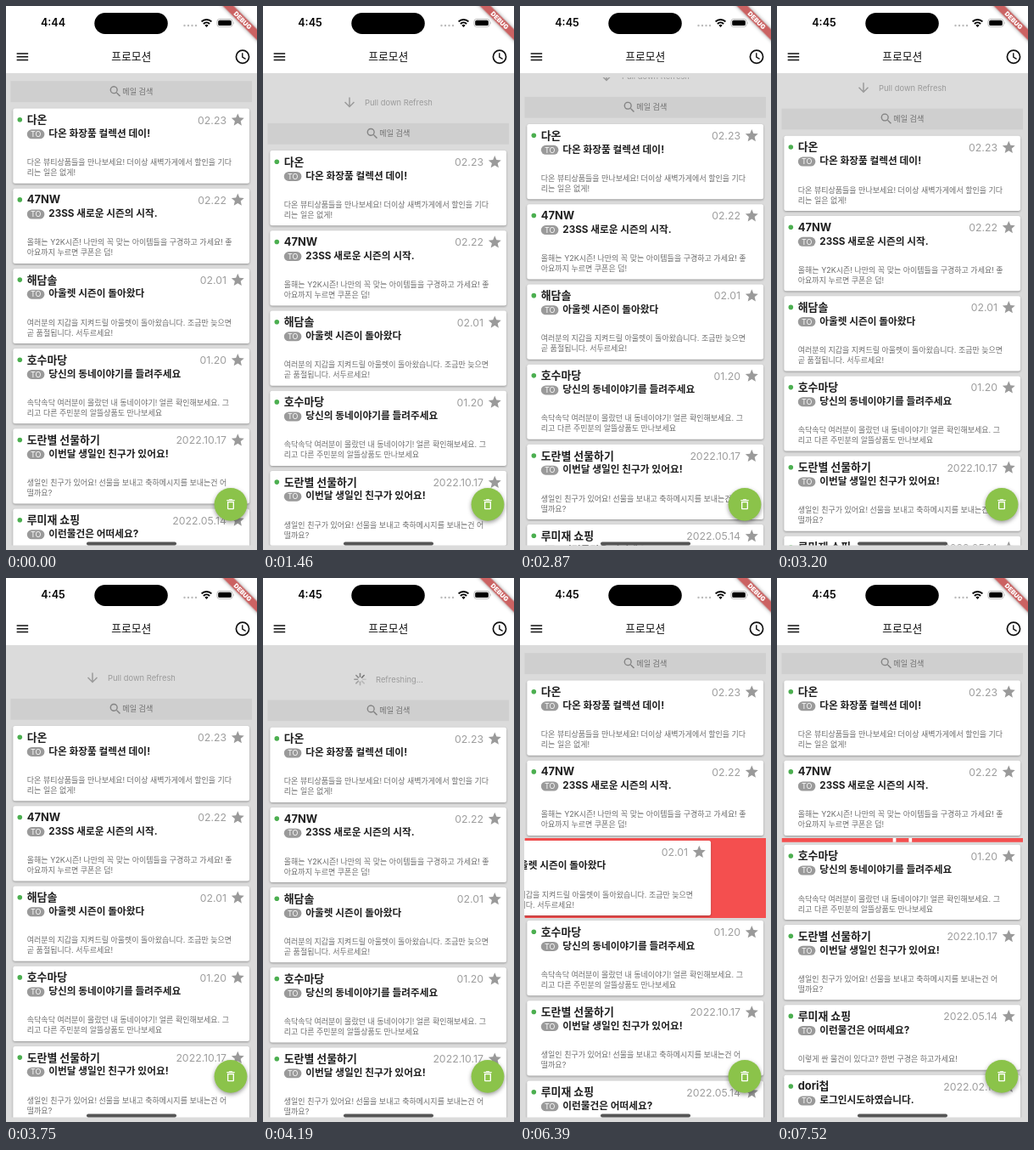
Recreate the animation shown at these times as an HTML page. Size 296 px wide and 640 px high, loop 8000 ms.

```html
<!DOCTYPE html>
<html lang="ko">
<head>
<meta charset="utf-8">
<title>프로모션</title>
<style>
html, body { margin: 0; width: 100%; height: 100%; overflow: hidden; background: #fff; }
#stage { display: block; width: 100vw; height: 100vh; font-family: Inter, "Noto Sans CJK KR", "Noto Sans CJK", sans-serif; }
.card { fill: #fff; filter: drop-shadow(0 1px 1px rgba(0, 0, 0, .32)); }
.title { font-size: 12.9px; font-weight: 700; fill: #1f1f1f; }
.sub { font-size: 11.7px; font-weight: 700; fill: #1f1f1f; }
.body { font-size: 9px; fill: #6c6c6c; }
.date { font-size: 12.3px; fill: #9e9e9e; text-anchor: end; }
.pill { font-size: 9px; fill: #fff; text-anchor: middle; }
.head { font-size: 9.4px; fill: #9b9b9b; }
</style>
</head>
<body>
<svg id="stage" viewBox="0 0 296 640" xmlns="http://www.w3.org/2000/svg"></svg>
<script>
const LOOP = 8000;
const TOP = 120.5, TALL = 94.2, SHORT = 82.6, GAP = 6, SWIPED = 2;

const mails = [
  ['다온', '02.23', '다온 화장품 컬렉션 데이!', '다온 뷰티상품들을 만나보세요! 더이상 새벽가게에서 할인을 기다', '리는 일은 없게!'],
  ['47NW', '02.22', '23SS 새로운 시즌의 시작.', '올해는 Y2K시즌! 나만의 꼭 맞는 아이템들을 구경하고 가세요! 좋', '아요까지 누르면 쿠폰은 덤!'],
  ['해담솔', '02.01', '아울렛 시즌이 돌아왔다', '여러분의 지갑을 지켜드릴 아울렛이 돌아왔습니다. 조금만 늦으면', '곧 품절됩니다. 서두르세요!'],
  ['호수마당', '01.20', '당신의 동네이야기를 들려주세요', '속닥속닥 여러분이 몰랐던 내 동네이야기! 얼른 확인해보세요. 그', '리고 다른 주민분의 알뜰상품도 만나보세요'],
  ['도란별 선물하기', '2022.10.17', '이번달 생일인 친구가 있어요!', '생일인 친구가 있어요! 선물을 보내고 축하메시지를 보내는건 어', '떨까요?'],
  ['루미재 쇼핑', '2022.05.14', '이런물건은 어떠세요?', '이렇게 싼 물건이 있다고? 한번 구경은 하고가세요!', ''],
  ['dori첩', '2022.02.18', '로그인시도하였습니다.', '새로운 기기에서 로그인을 시도하였습니다.', '']
];

// A mail with one line of body text is shorter
const pitch = mail => mail[4] ? TALL : SHORT;
const tops = mails.map((_, i) => mails.slice(0, i).reduce((y, m) => y + pitch(m), TOP));

// Icons on a 24 unit grid
const icons = {
  menu: 'M3 18h18v-2H3zm0-5h18v-2H3zm0-7v2h18V6z',
  star: 'M12 17.27 18.18 21l-1.64-7.03L22 9.24l-7.19-.61L12 2 9.19 8.63 2 9.24l5.46 4.73L5.82 21z',
  trash: 'M6 19c0 1.1.9 2 2 2h8c1.1 0 2-.9 2-2V7H6zM8 9h8v10H8zm7.5-5-1-1h-5l-1 1H5v2h14V4z',
  search: 'M15.5 14h-.8l-.3-.3A6.5 6.5 0 1 0 13.7 14.4l.3.3v.8l5 5 1.5-1.5zm-6 0a4.5 4.5 0 1 1 0-9 4.5 4.5 0 0 1 0 9z',
  down: 'M20 12l-1.4-1.4L13 16.2V4h-2v12.2l-5.6-5.6L4 12l8 8z',
  reload: 'M17.65 6.35A8 8 0 1 0 19.73 14h-2.08A6 6 0 1 1 12 6c1.66 0 3.14.69 4.22 1.78L13 11h7V4z',
  done: 'M9 16.2 4.8 12l-1.4 1.4L9 19 21 7l-1.4-1.4z'
};

const icon = (name, x, y, size, fill) =>
  `<path d="${icons[name]}" fill="${fill}" fill-rule="evenodd" transform="translate(${x - size / 2} ${y - size / 2}) scale(${size / 24})"/>`;
const text = (cls, x, y, str) => `<text class="${cls}" x="${x}" y="${y}">${str}</text>`;
const rect = (x, y, w, h, r, fill) => `<rect x="${x}" y="${y}" width="${w}" height="${h}" rx="${r}" fill="${fill}"/>`;

const mailRow = (mail, i) => {
  const [name, date, sub, line1, line2] = mail;
  return `
  <g id="row${i}">
    <rect class="card" x="8.3" width="278.8" height="${pitch(mail) - GAP}" rx="2.5"/>
    <circle cx="16.3" cy="13.2" r="2.8" fill="#4caf50"/>
    ${text('title', 24.7, 17.7, name)}
    ${text('date', 260, 18, date)}
    ${icon('star', 273.3, 13.4, 18, '#9a9a9a')}
    ${rect(24.8, 24.8, 20.6, 11, 5.5, '#9a9a9a')}
    ${text('pill', 35.1, 33.6, 'TO')}
    ${text('sub', 50.3, 33.6, sub)}
    ${text('body', 24.8, 66.8, line1)}
    ${text('body', 24.8, 78.8, line2)}
  </g>`;
};

const spokes = Array.from({ length: 8 }, (_, i) =>
  `<line class="spoke" y1="-3" y2="-6.6" stroke="#777" stroke-width="1.6" stroke-linecap="round" transform="rotate(${i * 45})"/>`).join('');

const modes = {
  pull: icon('down', 102, 0, 18, '#9b9b9b') + text('head', 120, 3.4, 'Pull down Refresh'),
  release: icon('reload', 102, 0, 18, '#9b9b9b') + text('head', 120, 3.4, 'Release to refresh'),
  busy: `<g transform="translate(114.5 0)">${spokes}</g>` + text('head', 133, 3.4, 'Refreshing…'),
  done: icon('done', 100, 0, 18, '#9b9b9b') + text('head', 118, 3.4, 'Refresh completed')
};

const statusBar = `
  <text id="clock" x="55.5" y="24.4" font-size="12.6" font-weight="600" text-anchor="middle"></text>
  ${rect(104.3, 8, 86.5, 25, 12.5, '#000')}
  ${[210.5, 215, 219.5, 224].map(x => `<circle cx="${x}" cy="23" r="1.2" fill="#bbb"/>`).join('')}
  <g fill="none" stroke="#000" stroke-width="2">
    <path d="M230.6 18.4a8.4 8.4 0 0 1 11.8 0M232.9 21a5.1 5.1 0 0 1 7.2 0"/>
  </g>
  <path d="M236.5 25l-2.1-2.2a3 3 0 0 1 4.2 0z"/>
  <rect x="248.9" y="15.4" width="18.2" height="9" rx="2.8" fill="none" stroke="#aaa" stroke-width=".8"/>
  ${rect(250.2, 16.7, 15.6, 6.4, 1.7, '#000')}
  <path d="M268.2 18.4q1.4 1.5 0 3z" fill="#aaa"/>`;

const appBar = `
  ${icon('menu', 19.4, 59.8, 18, '#111')}
  <text x="147.7" y="63.6" font-size="12.8" fill="#111" text-anchor="middle">프로모션</text>
  <circle cx="279" cy="59.8" r="7.6" fill="none" stroke="#111" stroke-width="1.7"/>
  <path d="M278.8 55.2v5l3.8 2.2" fill="none" stroke="#111" stroke-width="1.4"/>`;

const banner = `
  <g transform="translate(296 0) rotate(45)">
    <rect x="-34" y="19.4" width="68" height="9" fill="#cb6262" style="filter:drop-shadow(0 0 2px rgba(0,0,0,.4))"/>
    <text y="26.6" font-size="7.5" font-weight="900" fill="#fff" text-anchor="middle">DEBUG</text>
  </g>`;

const fab = `
  <circle cx="265" cy="586.3" r="19.4" fill="#8bc34a" style="filter:drop-shadow(0 2.5px 2.5px rgba(0,0,0,.4))"/>
  ${icon('trash', 265, 586.3, 16, '#fff')}`;

document.getElementById('stage').innerHTML = `
  <defs><clipPath id="view"><rect x="5" y="84" width="285.5" height="550.5"/></clipPath></defs>
  ${rect(0, 0, 296, 640, 0, '#fff')}
  ${rect(0, 79, 296, 561, 0, '#dbdbdb')}
  <g clip-path="url(#view)"><g id="list">
    ${Object.entries(modes).map(([k, v]) => `<g id="${k}" transform="translate(0 64)">${v}</g>`).join('')}
    ${rect(5.5, 88.3, 284.5, 24.8, 0, '#cfcfcf')}
    ${icon('search', 129, 100.5, 17, '#858585')}
    <text x="137.3" y="103.8" font-size="9.1" fill="#707070">메일 검색</text>
    <svg id="under" x="5.5" y="${tops[SWIPED] - GAP / 2}" width="284.5" overflow="hidden">
      ${rect(0, 0, 284.5, TALL, 0, '#f44f4f')}
      <g id="bin">${icon('trash', 142.4, 0, 45, '#fff')}</g>
    </svg>
    ${mails.map(mailRow).join('')}
  </g></g>
  ${fab}
  ${appBar}${statusBar}
  ${rect(95, 630.4, 106, 4, 2, '#555')}
  ${banner}`;

const $ = id => document.getElementById(id);
const rows = mails.map((_, i) => $('row' + i));
const spokeEls = [...document.querySelectorAll('.spoke')];

// Bursts of motion: start, end, number of pictures
const bursts = [
  [1120, 1460, 4], [1640, 2100, 5], [2410, 3200, 8], [3310, 4080, 8],
  [4190, 4820, 7], [5530, 5870, 4], [6270, 6390, 2], [6840, 7520, 7]
];

function snap(t) {
  const b = bursts.filter(([start]) => start <= t).pop();
  if (!b) return 0;
  const [start, end, n] = b, step = (end - start) / (n - 1);
  return Math.min(end, start + Math.floor((t - start) / step + 1e-3) * step);
}

const line = p => p;
const out = p => 1 - (1 - p) ** 3;
const smooth = p => p * p * (3 - 2 * p);

// Keys are [time, value, easing into this key]
function track(keys, t) {
  const i = keys.findIndex(k => k[0] > t);
  if (i < 0) return keys[keys.length - 1][1];
  if (i === 0) return keys[0][1];
  const [t0, v0] = keys[i - 1], [t1, v1, ease = line] = keys[i];
  return v0 + (v1 - v0) * ease((t - t0) / (t1 - t0));
}

const pullKeys = [
  [1040, 0], [1460, 49.6], [1560, 49.6], [2100, 0, out], [2405, 0], [3200, 32.3], [3750, 53.6],
  [4080, 63], [4120, 63], [4520, 45.2, out], [5450, 45.2], [5870, 0, smooth]
];
const swipeKeys = [[6180, 0], [6390, -62], [6730, -62], [7067, -290, smooth]];
const heightKeys = [[7180, TALL], [7520, 4.9, smooth]];

function draw(time) {
  const t = snap(time);
  const pull = track(pullKeys, t);
  const swipe = track(swipeKeys, t);
  const height = track(heightKeys, t);

  $('clock').textContent = t < 1120 ? '4:44' : '4:45';
  $('list').setAttribute('transform', `translate(0 ${pull})`);

  const mode = t >= 4820 ? 'done' : t >= 4190 ? 'busy' : pull >= 60 ? 'release' : 'pull';
  for (const k in modes) $(k).style.display = k === mode ? '' : 'none';
  const lead = Math.floor(t / 125);
  spokeEls.forEach((s, i) => s.setAttribute('opacity', 1 - ((lead - i) % 8 + 8) % 8 * 0.11));

  rows.forEach((row, i) => {
    const x = i === SWIPED ? swipe : 0;
    const y = tops[i] - (i > SWIPED ? TALL - height : 0);
    row.setAttribute('transform', `translate(${x} ${y})`);
  });
  rows[SWIPED].style.display = swipe <= -290 ? 'none' : '';
  $('under').style.display = swipe < 0 ? '' : 'none';
  $('under').setAttribute('height', height);
  $('bin').setAttribute('transform', `translate(0 ${height / 2})`);
}

const began = performance.now();
function tick() {
  draw((performance.now() - began) % LOOP);
  requestAnimationFrame(tick);
}
tick();
</script>
</body>
</html>
```
